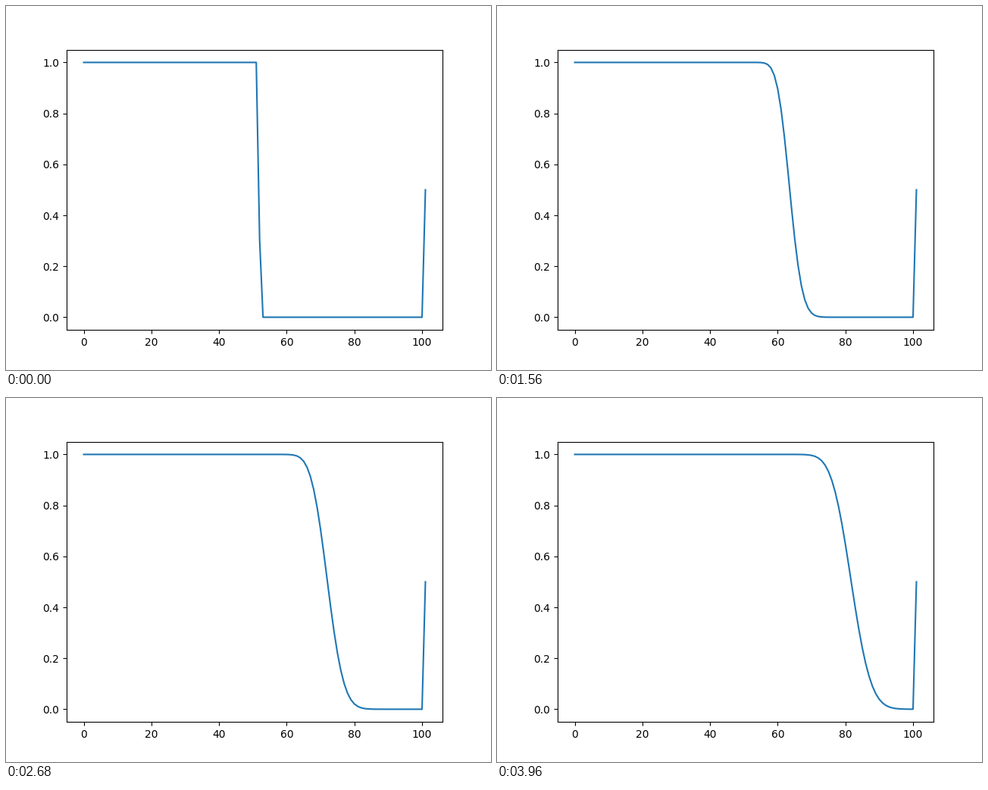
Recreate the animation shown at these times as a matplotlib script. Size 640x480 px, loop 4000 ms.

```python
import numpy as np
import matplotlib.pyplot as plt
from matplotlib.animation import FuncAnimation

FRAMES = 100
INTERVAL = 40
CELLS = 100
COURANT = 0.303  # share of a cell the front travels per step


def advect(u):
    """One first-order upwind step; both end cells stay fixed."""
    new = u.copy()
    new[1:-1] -= COURANT * (u[1:-1] - u[:-2])
    return new


def solve():
    u = np.zeros(CELLS + 2)
    u[:52] = 1.0
    u[-1] = 0.5
    states = []
    for _ in range(FRAMES):
        u = advect(u)
        states.append(u)
    return states


states = solve()
fig, ax = plt.subplots(figsize=(6.4, 4.8), dpi=100)
line, = ax.plot(np.arange(CELLS + 2), states[0])


def update(i):
    line.set_ydata(states[i])
    return line,


anim = FuncAnimation(fig, update, frames=FRAMES, interval=INTERVAL,
                     repeat=True, repeat_delay=0)
plt.show()
```
